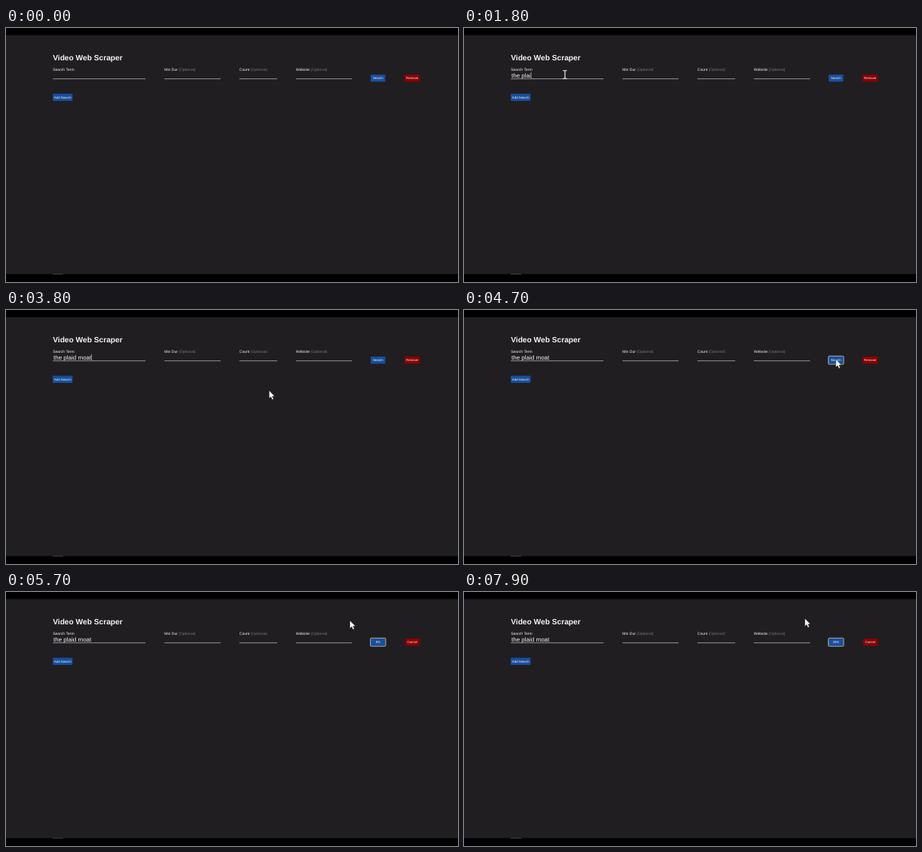
These frames come from a looping animation (600 by 338 pixels, 8000 ms). An HTML page:

```html
<!DOCTYPE html>
<html lang="en">
<head>
<meta charset="utf-8">
<title>Video Web Scraper</title>
<style>
  html, body { margin: 0; width: 100%; height: 100%; overflow: hidden; background: #000; }
  svg { display: block; width: 100vw; height: 100vh; }
  text { font-family: "Liberation Sans", Arial, sans-serif; fill: #f4f4f4; text-rendering: geometricPrecision; white-space: pre; }
  .title { font-size: 10.2px; font-weight: bold; }
  .label { font-size: 5.05px; }
  .hint { fill: #777; }
  .entry { font-size: 8px; }
  .button text { font-size: 4.35px; text-anchor: middle; }
</style>
</head>
<body>
<svg id="stage" viewBox="0 0 600 338">
  <rect width="600" height="338" fill="#000"/>
  <rect y="9.5" width="600" height="318" fill="#201e20"/>
  <rect x="62" y="327" width="14" height=".7" fill="#555"/>
  <text class="title" x="62.2" y="43.2">Video Web Scraper</text>
  <g id="fields"></g>
  <text id="entry" class="entry" x="63" y="65.6"></text>
  <rect id="caret" y="58.7" width=".6" height="8.3" fill="#ccc"/>
  <g id="buttons"></g>
  <rect id="focus" x="483.7" y="61.3" width="20.3" height="10.9" rx="1.2" fill="none" stroke="#d8d8d8" stroke-width=".8"/>
  <path id="beam" d="M-2.6-5.2H-.7L0-4.7L.7-5.2H2.6M0-4.7V4.7M-2.6 5.2H-.7L0 4.7L.7 5.2H2.6" fill="none" stroke="#fff" stroke-width="1.1"/>
  <path id="arrow" d="M0 0V10.4L2.4 8.2L4.1 12L5.9 11.2L4.2 7.5H7.4Z" fill="#fff" stroke="#111" stroke-width=".4"/>
</svg>
<script>
const LOOP = 8000, STEP = 100;
const PHRASE = "the plaid moat";
const KEY_TIMES = [1000, 1100, 1200, 1400, 1500, 1600, 1700, 1800, 1900, 2000, 2100, 2200, 2400, 2500];
const PROGRESS = [[4800, 0], [6200, 5], [6800, 10], [7500, 15], [7800, 20]];
// Pointer stops: time, x, y
const POINTER = [
  [100, 168, 82], [500, 134, 62], [2900, 134, 62], [3800, 349.3, 107.2],
  [4600, 493.6, 65.7], [4700, 493.6, 65.7], [5600, 456.5, 38], [5700, 456.5, 38],
  [6200, 452.5, 35.2], [LOOP, 452.5, 35.2]
];

const byId = id => document.getElementById(id);
const entry = byId("entry"), caret = byId("caret"), focusRing = byId("focus");
const beam = byId("beam"), arrow = byId("arrow");

function add(parent, tag, attrs, content = "") {
  const node = document.createElementNS("http://www.w3.org/2000/svg", tag);
  for (const name in attrs) node.setAttribute(name, attrs[name]);
  node.textContent = content;
  return parent.appendChild(node);
}

function addField(x, width, name, optional) {
  const label = add(byId("fields"), "text", { class: "label", x, y: 56.6 }, name);
  if (optional) add(label, "tspan", { class: "hint" }, " (Optional)");
  add(byId("fields"), "rect", { x, y: 67.4, width, height: .7, fill: "#c4c4c4" });
}

function addButton(x, y, width, fill, name) {
  const group = add(byId("buttons"), "g", { class: "button" });
  const box = add(group, "rect", { x, y, width, height: 9.6, rx: 1, fill });
  const text = add(group, "text", { x: x + width / 2, y: y + 6.3 }, name);
  return { box, text };
}

addField(62.2, 123, "Search Term");
addField(210.3, 74.5, "Min Dur", true);
addField(309.8, 50.2, "Count", true);
addField(384.8, 74.5, "Website", true);
const search = addButton(484, 61.9, 19.6, "#174f9e", "Search");
const remove = addButton(529, 61.9, 20.4, "#8b0000", "Remove");
addButton(62, 87.5, 26.4, "#174f9e", "Add Search");

function pointerAt(t) {
  const i = Math.max(1, POINTER.findIndex(stop => stop[0] > t));
  const [t0, x0, y0] = POINTER[i - 1], [t1, x1, y1] = POINTER[i];
  const p = Math.min(1, Math.max(0, (t - t0) / (t1 - t0)));
  const e = p * p * (3 - 2 * p);
  return [x0 + (x1 - x0) * e, y0 + (y1 - y0) * e];
}

const show = (node, on) => node.setAttribute("visibility", on ? "visible" : "hidden");

function render(time) {
  const t = Math.floor((time % LOOP) / STEP) * STEP;

  entry.textContent = PHRASE.slice(0, KEY_TIMES.filter(k => k <= t).length);
  caret.setAttribute("x", 63 + (entry.textContent ? entry.getComputedTextLength() : 0));
  show(caret, t >= 800 && t < 4600);

  const [x, y] = pointerAt(t);
  const overField = x > 62 && x < 185 && y > 56 && y < 69;
  for (const node of [beam, arrow]) node.setAttribute("transform", `translate(${x} ${y})`);
  show(beam, t >= 100 && overField);
  show(arrow, t >= 100 && !overField);

  const reached = PROGRESS.filter(([start]) => start <= t).pop();
  search.text.textContent = reached ? reached[1] + "%" : "Search";
  remove.text.textContent = reached ? "Cancel" : "Remove";
  remove.box.setAttribute("x", reached ? 529.8 : 529);
  remove.box.setAttribute("width", reached ? 19.6 : 20.4);
  show(focusRing, t >= 4600);
}

function tick() {
  render(performance.now());
  requestAnimationFrame(tick);
}
tick();
</script>
</body>
</html>
```
